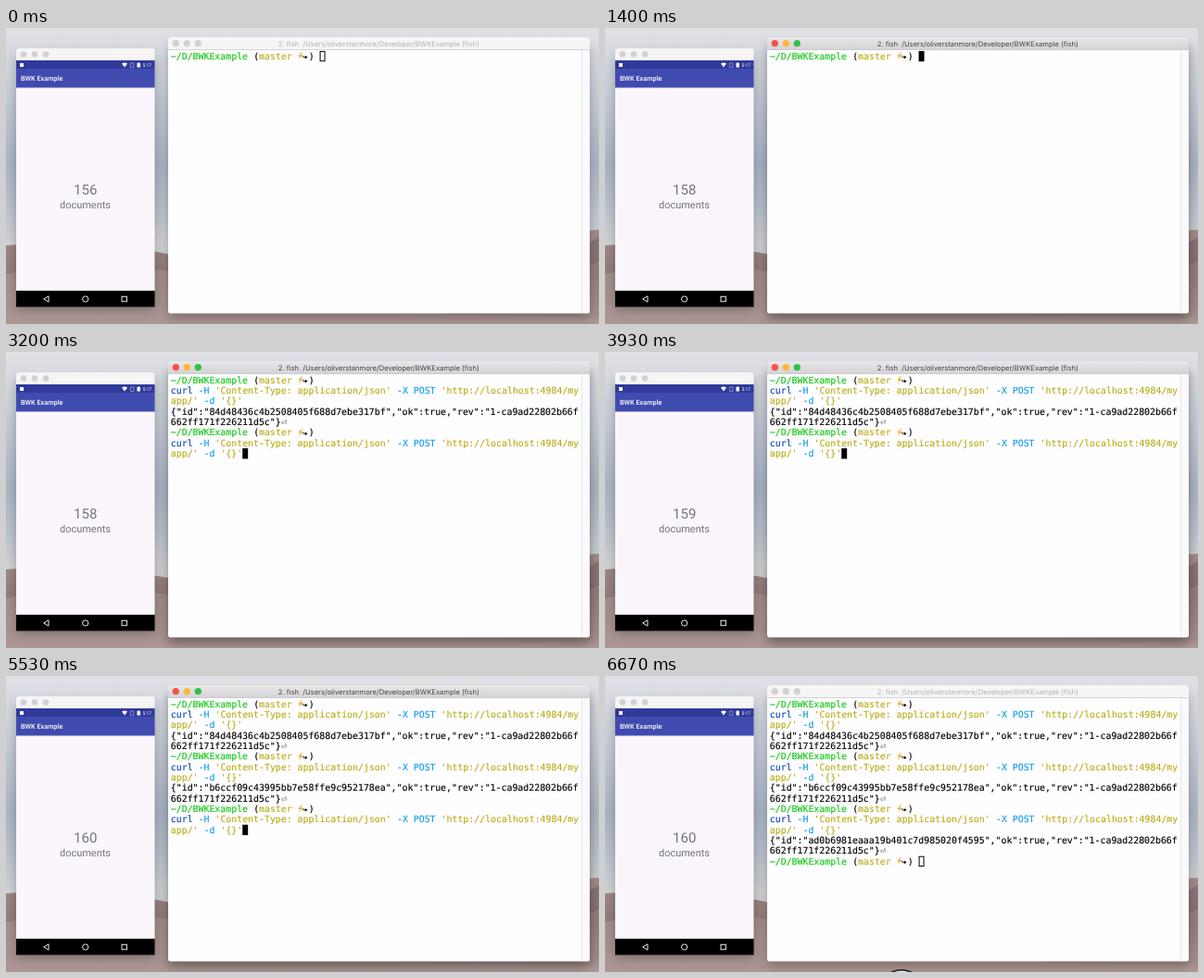
These frames come from a looping animation (640x320 px, 6740 ms). An HTML page:

```html
<!DOCTYPE html>
<html lang="en">
<head>
<meta charset="utf-8">
<title>Terminal and phone</title>
<style>
html, body { margin: 0; width: 100%; height: 100%; overflow: hidden; background: #b5bcc8; }
svg { display: block; width: 640px; height: 320px; }
text { white-space: pre; text-rendering: geometricPrecision; }
.mono { font: 9.9px "DejaVu Sans Mono", monospace; }
.mono text { fill: currentColor; stroke: currentColor; stroke-width: .15px; }
.ui { font-family: Roboto, sans-serif; }
.title { font: 7.6px Inter, sans-serif; text-anchor: middle; }
</style>
</head>
<body>
<svg id="stage" viewBox="0 0 640 320" xmlns="http://www.w3.org/2000/svg">
  <defs>
    <linearGradient id="sky" x2="0" y2="1">
      <stop offset="0" stop-color="#e0e1e5"/>
      <stop offset=".2" stop-color="#c9cfd8"/>
      <stop offset=".46" stop-color="#a9b5c6"/>
      <stop offset=".6" stop-color="#b9c2cc"/>
      <stop offset=".72" stop-color="#d0d2d4"/>
    </linearGradient>
    <linearGradient id="sand" x2="0" y2="1">
      <stop offset="0" stop-color="#a48d89"/>
      <stop offset=".45" stop-color="#937b78"/>
      <stop offset="1" stop-color="#a89390"/>
    </linearGradient>
    <linearGradient id="bar" x2="0" y2="1">
      <stop offset="0" stop-color="#e9e7e9"/>
      <stop offset="1" stop-color="#d3d1d3"/>
    </linearGradient>
    <filter id="soft" x="-20%" y="-20%" width="140%" height="140%"><feGaussianBlur stdDeviation="6"/></filter>
  </defs>

  <rect width="640" height="320" fill="url(#sky)"/>
  <path d="M0 235 Q90 228 168 243 T400 250 Q560 224 640 218 V320 H0Z" fill="url(#sand)"/>
  <path d="M0 266 Q80 248 170 262 T420 308 L640 314 V320 H0Z" fill="#b09a96" opacity=".6"/>
  <path d="M640 226 Q632 230 620 240 V262 L640 252Z" fill="#7a6869" opacity=".6"/>

  <rect x="11" y="29" width="150" height="276" rx="4" opacity=".25" filter="url(#soft)"/>
  <rect id="shade" x="175" y="20" width="455" height="294" rx="4" filter="url(#soft)"/>

  <g id="phone" class="ui">
    <path d="M11 36V25q0-3 3-3H157.500q3 0 3 3V36Z" fill="#f6f5f6"/>
    <g fill="#d2d0d2"><circle cx="19" cy="28.500" r="3.300"/><circle cx="31" cy="28.500" r="3.300"/><circle cx="43" cy="28.500" r="3.300"/></g>
    <rect x="11" y="35" width="149.500" height="9" fill="#303a9b"/>
    <rect x="11" y="44" width="149.500" height="21" fill="#404bb0"/>
    <rect x="11" y="64.500" width="149.500" height="220" fill="#faf6fc"/>
    <rect x="11" y="284" width="149.500" height="17.500"/>
    <g fill="#fff">
      <rect x="15" y="38" width="4" height="4"/>
      <path d="M125 38.500q3-2 6 0l-3 4Z"/>
      <path d="M141.500 38h1v-.700h1.500v.700h1v4.500h-3.500Z"/>
      <text x="147.500" y="42" font-size="5">5:17</text>
      <text x="16" y="57" font-size="7.300" font-weight="500">BWK Example</text>
    </g>
    <path d="M134.500 38h3.500v4.500h-3.500Z" fill="none" stroke="#8f97d0" stroke-width=".8"/>
    <g fill="none" stroke="#e8e8e8">
      <path d="M46 289.800v6.400l-5.300-3.200Z"/>
      <circle cx="85.700" cy="293" r="3.100"/>
      <rect x="125" y="290.300" width="5.400" height="5.400"/>
    </g>
    <g fill="#77747a" text-anchor="middle">
      <text id="count" x="85.700" y="180" font-size="15"></text>
      <text x="85.500" y="195.200" font-size="11">documents</text>
    </g>
  </g>

  <g id="term">
    <path d="M175 24V14q0-4 4-4H626q4 0 4 4V24Z" id="head"/>
    <g id="lights"></g>
    <text id="name" class="title" x="402.300" y="19.500">2. fish  /Users/oliverstanmore/Developer/BWKExample (fish)</text>
    <path d="M175 23.500H630V306q0 2.500-2.500 2.500H177.500q-2.500 0-2.500-2.500Z" fill="#fefdff"/>
    <rect x="621.500" y="23.500" width="8.500" height="283" fill="#faf9fb"/>
    <path d="M175 23.500H630" stroke="#bdbbbd" stroke-width=".6"/>
    <path d="M621.500 24V308.500" stroke="#e6e6e6"/>
    <g id="lines" class="mono"></g>
    <rect id="cursor"/>
  </g>

  <g id="badge">
    <circle cx="320" cy="341" r="24" fill="#222"/>
    <circle cx="320" cy="341" r="21.500" fill="none" stroke="#eee" stroke-width="1.500"/>
  </g>
</svg>
<script>
const LOOP = 6740;
const FOCUS = [800, 6400];
const BADGE = 6600;
const COUNTS = [[0, 156], [600, 157], [1100, 158], [3800, 159], [5000, 160]];
const CALLS = [
  { typed: 1900, reply: 2600, id: '84d48436c4b2508405f688d7ebe317bf' },
  { typed: 2900, reply: 4000, id: 'b6ccf09c43995bb7e58ffe9c952178ea' },
  { typed: 5000, reply: 6100, id: 'ad0b6981eaaa19b401c7d985020f4595' }
];
const LEFT = 177.8, TOP = 33.8, CELL = 5.955, LEAD = 11.32;
const GREEN = '#14c814', OLIVE = '#b8ae18', BLUE = '#0a45b4', CYAN = '#129fe8', BLACK = '#000';

const $ = id => document.getElementById(id);
const add = (parent, tag, attrs, text = '') => {
  const el = document.createElementNS('http://www.w3.org/2000/svg', tag);
  for (const key in attrs) el.setAttribute(key, attrs[key]);
  el.textContent = text;
  return parent.appendChild(el);
};
const colX = col => LEFT + col * CELL;
const rowY = row => TOP + row * LEAD;
const timed = [];
const block = from => {
  const g = add($('lines'), 'g', {});
  timed.push({ g, from });
  return g;
};

// Writes coloured runs of text on one row of the character grid.
function write(g, row, ...runs) {
  let col = 0;
  for (const [text, color] of runs) {
    add(g, 'text', { x: colX(col), y: rowY(row), color }, text);
    col += text.length;
  }
}

function prompt(row, from) {
  const g = block(from), x = colX(23), y = rowY(row);
  write(g, row, ['~/D/BWKExample ', GREEN], ['(', BLACK], ['master', OLIVE], ['   ', BLACK], [')', BLACK]);
  add(g, 'path', { d: `M${x + 4} ${y - 7.5}l-3.600 4.400h2.400l-1.600 3.600 4.600-5h-2.600l2-3Z`, fill: '#e8b430' });
  add(g, 'path', { d: `M${x + 6} ${y - 4}v1.800h3`, fill: 'none', stroke: BLACK, 'stroke-width': 0.7 });
  add(g, 'path', { d: `M${x + 8} ${y - 4}l2.800 1.800-2.800 1.800Z` });
}

function command(row, from) {
  const g = block(from);
  write(g, row, ['curl ', BLUE], ['-H ', CYAN], ["'Content-Type: application/json' ", OLIVE],
    ['-X POST ', CYAN], ["'http://localhost:4984/my", OLIVE]);
  write(g, row + 1, ["app/' ", OLIVE], ['-d ', CYAN], ["'{}'", OLIVE]);
}

function reply(row, from, id) {
  const g = block(from);
  write(g, row, [`{"id":"${id}","ok":true,"rev":"1-ca9ad22802b66f`, BLACK]);
  write(g, row + 1, ['662ff171f226211d5c"}', BLACK], ['⏎', '#777']);
}

prompt(0, 0);
CALLS.forEach((call, i) => {
  const row = i * 5;
  command(row + 1, call.typed);
  reply(row + 3, call.reply, call.id);
  prompt(row + 5, call.reply);
});
const lights = ['#f4524e', '#fdb83a', '#30c046'].map((color, i) => ({
  color, el: add($('lights'), 'circle', { cx: 183.3 + i * 12, cy: 16.6, r: 3.7 })
}));

function cursorCell(t) {
  let cell = [27, 0];
  CALLS.forEach((call, i) => {
    if (t >= call.typed) cell = [13, i * 5 + 2];
    if (t >= call.reply) cell = [27, i * 5 + 5];
  });
  return cell;
}

function render(t) {
  const active = t >= FOCUS[0] && t < FOCUS[1];
  const set = (id, attrs) => { for (const k in attrs) $(id).setAttribute(k, attrs[k]); };
  set('head', { fill: active ? 'url(#bar)' : '#f6f5f6' });
  set('name', { fill: active ? '#454345' : '#b4b2b4' });
  set('shade', { opacity: active ? 0.38 : 0.25 });
  for (const { el, color } of lights) el.setAttribute('fill', active ? color : '#d2d0d2');
  for (const { g, from } of timed) g.style.display = t >= from ? '' : 'none';
  const [col, row] = cursorCell(t);
  const inset = active ? 0 : 0.5;
  set('cursor', {
    x: colX(col) + inset, y: rowY(row) - 8.9 + inset,
    width: CELL - 2 * inset, height: LEAD - 2 * inset,
    fill: active ? BLACK : 'none', stroke: active ? 'none' : BLACK
  });
  $('count').textContent = COUNTS.filter(([at]) => t >= at).pop()[1];
  $('badge').style.display = t >= BADGE ? '' : 'none';
}

const start = performance.now();
function tick() {
  render((performance.now() - start) % LOOP);
  requestAnimationFrame(tick);
}
tick();
</script>
</body>
</html>
```
